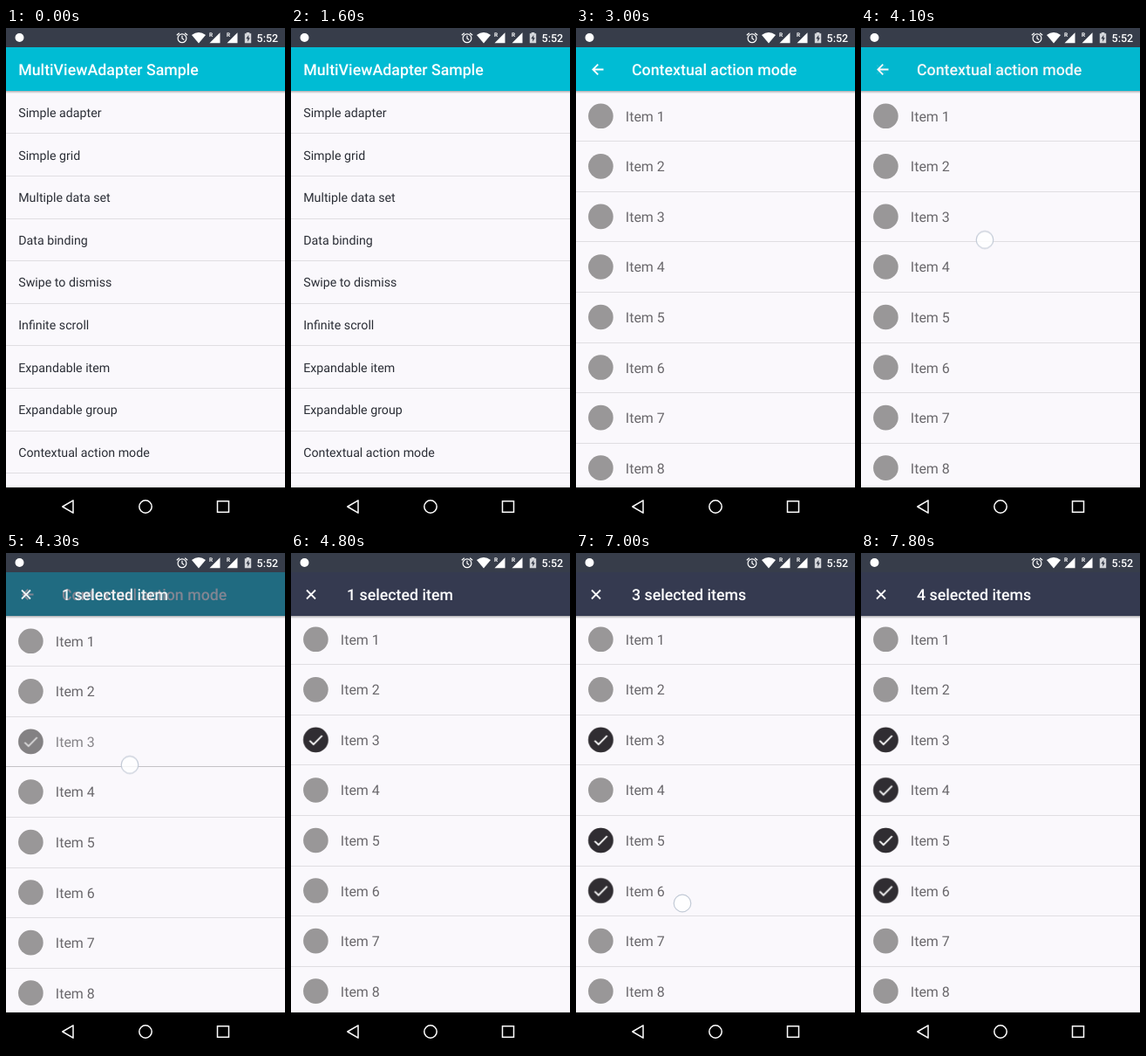
Write an HTML page that moves like this. It is 320x569 px and loops after 8000 ms.

```html
<!DOCTYPE html>
<html lang="en">
<head>
<meta charset="utf-8">
<title>MultiViewAdapter Sample</title>
<style>
html, body { margin: 0; width: 100%; height: 100%; overflow: hidden; background: #000; }
svg { display: block; width: 100vw; height: 100vh; font-family: Roboto, sans-serif; text-rendering: geometricPrecision; }
.title { font-size: 17.78px; font-weight: 500; fill: #fff; }
.menu { font-size: 14.22px; fill: #2b2e36; }
.label { font-size: 16px; fill: #6a686c; }
.line { fill: #e0dee2; }
.icon { fill: none; stroke: #fff; stroke-width: 1.8; }

/* One loop is 8 s, stepped every 100 ms (1.25%). */
.screen, .list, .bar, .bar-text, .touch, .count, .sel, .disc3, .tick3, .label3, .line3 {
  animation: 8s step-end infinite;
}
.screen { animation-name: open; }
.list { animation-name: nudge; }
.bar { animation-name: bar; }
.bar-text { animation-name: bar-text; }
.touch { animation-name: touch; }
.count1 { animation-name: count1; }
.count2 { animation-name: count2; }
.count3 { animation-name: count3; }
.count4 { animation-name: sel4; }
.sel4 { animation-name: sel4; }
.sel5 { animation-name: sel5; }
.sel6 { animation-name: sel6; }
.disc3 { animation-name: disc3; }
.tick3 { animation-name: tick3; }
.label3 { animation-name: label3; }
.line3 { animation-name: line3; }

@keyframes open {
  0% { opacity: 0; transform: translateY(45px); }
  21.25% { opacity: .89; transform: translateY(11px); }
  22.5% { opacity: 1; transform: translateY(1px); }
  23.75%, to { opacity: 1; transform: none; }
}
@keyframes nudge {
  0% { transform: none; }
  58.75% { transform: translateY(-1px); }
  60%, to { transform: translateY(-2px); }
}
@keyframes bar {
  0% { opacity: 0; }
  51.25% { opacity: .04; }
  52.5% { opacity: .25; }
  53.75% { opacity: .62; }
  55%, to { opacity: 1; }
}
@keyframes bar-text {
  0% { opacity: 0; }
  51.25% { opacity: .08; }
  52.5% { opacity: .45; }
  53.75% { opacity: .9; }
  55%, to { opacity: 1; }
}
@keyframes touch {
  0% { opacity: 0; transform: translate(142px, 242.5px); }
  43.75% { opacity: 1; transform: translate(142px, 242.5px); }
  58.75% { opacity: 0; transform: translate(120px, 347.5px); }
  68.75% { opacity: 1; transform: translate(120px, 347.5px); }
  75% { opacity: 0; transform: translate(122px, 401px); }
  82.5% { opacity: 1; transform: translate(122px, 401px); }
  88.75% { opacity: 0; transform: translate(121px, 286px); }
  93.75% { opacity: 1; transform: translate(121px, 286px); }
  97.5%, to { opacity: 0; transform: translate(121px, 286px); }
}
@keyframes count1 { 0% { opacity: 1; } 71.25%, to { opacity: 0; } }
@keyframes count2 { 0% { opacity: 0; } 71.25% { opacity: 1; } 86.25%, to { opacity: 0; } }
@keyframes count3 { 0% { opacity: 0; } 86.25% { opacity: 1; } 95%, to { opacity: 0; } }
@keyframes sel5 { 0% { opacity: 0; } 71.25% { opacity: .5; } 72.5%, to { opacity: 1; } }
@keyframes sel6 { 0% { opacity: 0; } 86.25% { opacity: .5; } 87.5%, to { opacity: 1; } }
@keyframes sel4 { 0% { opacity: 0; } 95% { opacity: 1; } to { opacity: 1; } }
@keyframes disc3 { 0% { opacity: 0; } 52.5% { opacity: .06; } 53.75% { opacity: .2; } 55%, to { opacity: 1; } }
@keyframes tick3 { 0% { opacity: 0; } 52.5% { opacity: .2; } 53.75% { opacity: .7; } 55%, to { opacity: 1; } }
@keyframes label3 { 0% { opacity: 1; } 53.75% { opacity: .8; } 55%, to { opacity: 1; } }
@keyframes line3 { 0% { fill: #e0dee2; } 53.75% { fill: #c4c2c6; } 55%, to { fill: #e0dee2; } }
</style>
</head>
<body>
<svg viewBox="0 0 320 569">
  <defs>
    <linearGradient id="shade" x1="0" y1="0" x2="0" y2="1">
      <stop offset="0" stop-color="#000" stop-opacity=".3"/>
      <stop offset="1" stop-color="#000" stop-opacity="0"/>
    </linearGradient>
    <path id="signal" d="M6 -6V6H-6Z"/>
  </defs>

  <g>
    <rect y="22" width="320" height="504" fill="#faf8fc"/>
    <g id="menu"></g>
    <rect y="22" width="320" height="50" fill="#00bcd4"/>
    <rect y="72" width="320" height="3" fill="url(#shade)"/>
    <text class="title" x="14.2" y="54">MultiViewAdapter Sample</text>
  </g>

  <g class="screen">
    <rect y="22" width="320" height="510" fill="#faf8fc"/>
    <g class="list" id="items"></g>
    <rect y="22" width="320" height="50" fill="#00bcd4"/>
    <rect y="72" width="320" height="3" fill="url(#shade)"/>
    <path class="icon" d="M31.5 47.5H19.5M25.3 41.6L19.4 47.5L25.3 53.4"/>
    <text class="title" x="64" y="54">Contextual action mode</text>
    <rect class="bar" y="22" width="320" height="50" fill="#353a50"/>
    <g class="bar-text">
      <path class="icon" d="M18 42.5L28 52.5M28 42.5L18 52.5"/>
      <g id="counts"></g>
    </g>
  </g>

  <circle class="touch" r="9.8" fill="#fff" fill-opacity=".8" stroke="#c2cad6" stroke-width="1.2"/>

  <g fill="#fff">
    <rect width="320" height="22" fill="#373d4a"/>
    <circle cx="15.5" cy="11" r="5"/>
    <g fill="none" stroke="#fff" stroke-width="1.2">
      <circle cx="202" cy="11.8" r="4.9"/>
      <path d="M202 8.8V12L204.3 13.5M195.8 8.2L198.8 5.7M208.2 8.2L205.2 5.7"/>
    </g>
    <path d="M221 17.6L213 8Q221 2 229 8Z"/>
    <use href="#signal" x="239.5" y="11.2"/>
    <use href="#signal" x="259.5" y="11.2"/>
    <g font-size="6.5" font-weight="700">
      <text x="233" y="10">R</text>
      <text x="253" y="10">R</text>
    </g>
    <path d="M275.7 5V6.2H273.8V17.3H281.2V6.2H279.3V5Z" fill="#d4d6da"/>
    <path d="M278.3 8L275.3 12.3H277.2V15.8L279.8 11.3H278.3Z" fill="#373d4a"/>
    <text x="287.6" y="15.8" font-size="12.5" font-weight="500">5:52</text>
  </g>

  <rect y="526" width="320" height="43"/>
  <g class="icon" style="stroke-width: 1.5">
    <path d="M64.8 548L77 540.8V555.2Z" stroke-linejoin="round"/>
    <circle cx="160" cy="548" r="7.2"/>
    <rect x="242.5" y="541.7" width="13" height="12.6"/>
  </g>
</svg>

<script>
const fill = (id, rows) => { document.getElementById(id).innerHTML = rows.join(""); };
const line = (y, cls = "") => `<rect class="line ${cls}" y="${Math.round(y)}" width="320" height="1"/>`;

const menu = ["Simple adapter", "Simple grid", "Multiple data set", "Data binding", "Swipe to dismiss",
  "Infinite scroll", "Expandable item", "Expandable group", "Contextual action mode"];

fill("menu", menu.map((name, i) => {
  const y = 48.62 * i;
  return `<text class="menu" x="14.2" y="${102 + y}">${name}</text>` + line(120.3 + y);
}));

const check = n => {
  const [disc, tick] = n === 3 ? ["disc3", "tick3"] : ["", ""];
  return `<g class="${n === 3 ? "" : "sel sel" + n}">
    <circle class="${disc}" r="14.3" fill="#302d32"/>
    <path class="icon ${tick}" d="M-7 .8L-2.6 5.2L7.3 -4.8"/></g>`;
};

fill("items", Array.from({ length: 8 }, (_, i) => {
  const n = i + 1, y = 57.55 * i, third = n === 3;
  return `<g transform="translate(28.4 ${100.8 + y})"><circle r="14.3" fill="#999798"/>
    ${n > 2 && n < 7 ? check(n) : ""}</g>
    <text class="label ${third ? "label3" : ""}" x="56.8" y="${106.8 + y}">Item ${n}</text>`
    + line(129.3 + y, third ? "line3" : "");
}));

fill("counts", [1, 2, 3, 4].map(n =>
  `<text class="title count count${n}" x="64" y="54">${n} selected item${n > 1 ? "s" : ""}</text>`));
</script>
</body>
</html>
```
